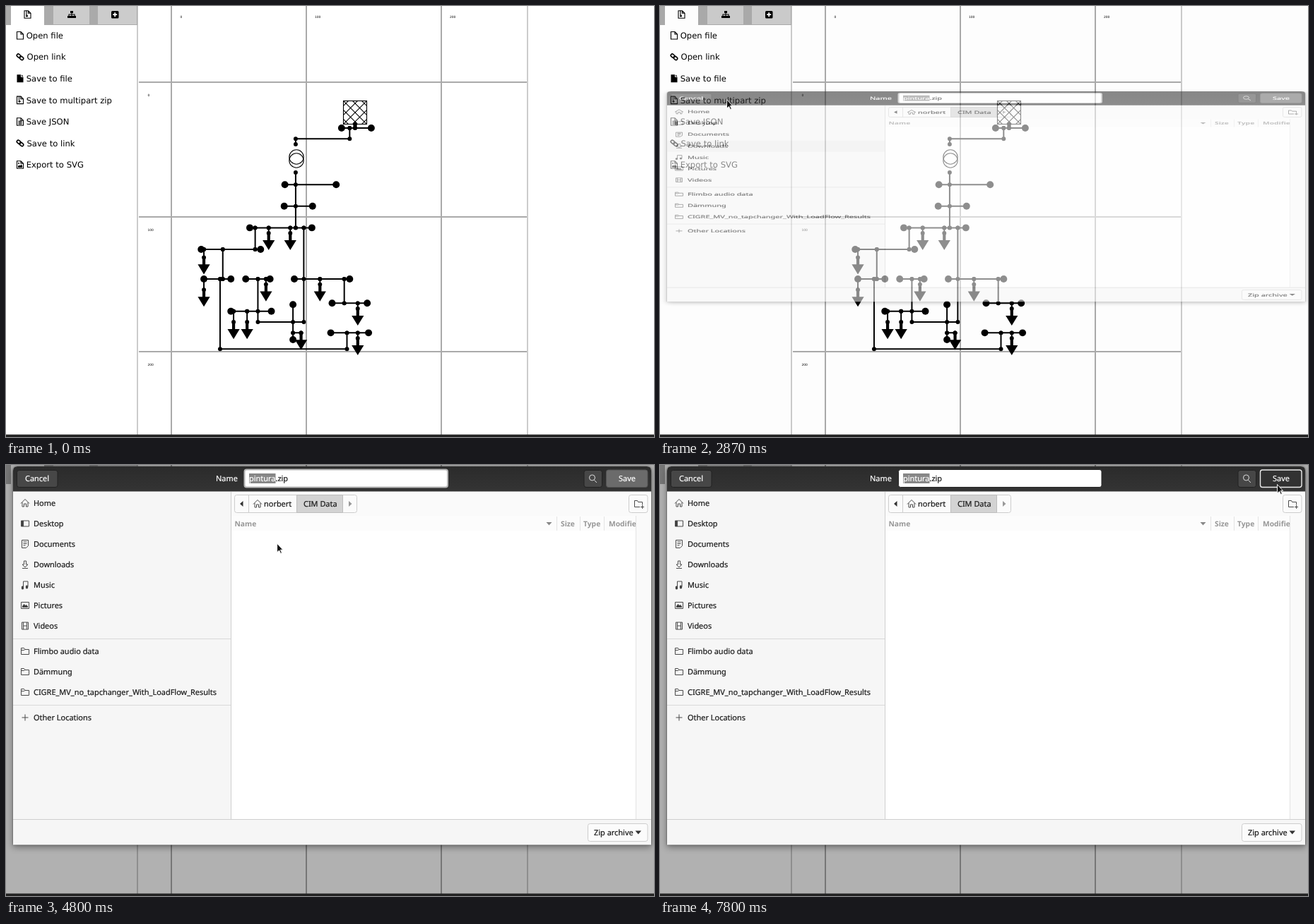
An HTML page that plays this animation: 917 by 611 pixels, repeating every 8 s.

```html
<!DOCTYPE html>
<html lang="en">
<head>
<meta charset="utf-8">
<title>Save to multipart zip</title>
<style>
  html, body { margin: 0; width: 100%; height: 100%; overflow: hidden; background: #fff; }
  svg { display: block; width: 100%; height: 100%; }
  text { text-rendering: geometricPrecision; white-space: pre; }
  marker { overflow: visible; }
  .page { font: 11.6px "DejaVu Sans", sans-serif; }
  .tick { font-size: 4.4px; }
  .url { font-size: 10.3px; fill: #444; }
  .ui { font: 10.95px "Noto Sans", sans-serif; }
  .ui text { color: #1c1c1c; fill: currentColor; stroke: currentColor; stroke-width: .22; }
  .ui .light { color: #fff; }
  .ui .col { color: #979797; font-weight: 700; font-size: 10.3px; stroke: none; }
  .line { fill: none; stroke: #4a4a4a; }
  .thin { fill: none; stroke: #000; stroke-width: 1.1; }
  .btn { fill: #fbfbfb; stroke: #cdcdcd; }
  .dark { fill: #474747; stroke: #222; }
  .wires path { fill: none; stroke: #000; stroke-width: 1.05; }
  .wire { marker: url(#dot); }
  .bus { marker: url(#end); marker-mid: url(#dot); }
  .load { marker-start: url(#dot); marker-end: url(#load); }
  #dialog { transform-origin: 461px 270px; }
  #frame { filter: drop-shadow(0 0 1px rgba(0, 0, 0, .5)) drop-shadow(0 3px 5px rgba(0, 0, 0, .4)); }
</style>
</head>
<body>
<svg viewBox="0 0 917 611" preserveAspectRatio="none">
  <defs>
    <linearGradient id="bar" x2="0" y2="1"><stop stop-color="#2b2b2b"/><stop offset="1" stop-color="#343434"/></linearGradient>
    <clipPath id="hatch"><path d="M477.5 134.5h33v33h-33z"/></clipPath>
    <clipPath id="list"><path d="M319 72h572.5v430H319z"/></clipPath>
    <marker id="dot" markerUnits="userSpaceOnUse"><circle r="1.55"/></marker>
    <marker id="end" markerUnits="userSpaceOnUse"><circle r="2.6"/></marker>
    <marker id="load" markerUnits="userSpaceOnUse"><circle r="1.55"/><path d="M-1.1 0h2.2v5.2h3.4l-4.5 7.4-4.5-7.4h3.4z" style="fill:#000;stroke:none"/></marker>
  </defs>

  <g class="page">
    <path fill="#fff" d="M0 0h917v611H0z"/>
    <path d="M186 0V608M738 0V608" stroke="#ccc" stroke-width="2"/>
    <g id="grid" stroke="#aaa" stroke-width="2"></g>
    <path fill="#aaa" d="M0 0h186v27H0z"/>
    <path fill="#fff" d="M7 0h47v28H7z"/>
    <path fill="#ccc" d="M67 0h51v26H67zM130 0h55v26h-55z"/>
    <path d="M91 7h4v3h-4zM87 14h4v3h-4zM91 14h4v3h-4zM95 14h4v3h-4z"/>
    <path class="thin" d="M93 10v4M89 14v-2h8v2"/>
    <rect x="149" y="7" width="10.5" height="10.5" rx="1.5"/>
    <path d="M154.2 9.2v6M151.2 12.2h6" stroke="#fff" stroke-width="1.8"/>
    <g id="menu"></g>
    <g id="wires" class="wires" transform="translate(234.2 108.1) scale(1.91)"></g>
    <path d="M491.5 167h5v5h-5z"/>
    <rect class="thin" x="477.5" y="134.5" width="33" height="33"/>
    <g id="mesh" class="thin" clip-path="url(#hatch)"></g>
    <circle class="thin" cx="411" cy="214" r="10.2"/>
    <circle class="thin" cx="411" cy="219" r="10.2"/>
    <g id="status">
      <path d="M-1 592.5H163q3.500 0 3.500 3.500V609H-1z" fill="#f4f4f4" stroke="#c4c4c4"/>
      <text class="url" x="3" y="604.5">https://sogno.energy/pintura/#</text>
    </g>
  </g>
  <path id="dim" d="M0 0h917v608H0z"/>
  <path fill="#222" d="M0 607.5h917v3.500H0z"/>

  <g id="dialog" class="ui">
    <path id="frame" fill="#f6f6f6" d="M10 538.500V8q0-6 6-6H907q6 0 6 6V538.500z"/>
    <path fill="url(#bar)" d="M10 37.500V8q0-6 6-6H907q6 0 6 6V37.500z"/>
    <rect class="dark" x="15.5" y="7.500" width="57.500" height="24" rx="3"/>
    <text class="light" x="27" y="23">Cancel</text>
    <text class="light" x="297" y="23">Name</text>
    <rect id="entry" x="337.5" y="6.500" width="287.500" height="25" rx="3" fill="#fff"/>
    <path fill="#878787" d="M344 12h37.500v14H344z"/>
    <text class="light" x="344" y="23">pintura<tspan color="#1c1c1c">.zip</tspan></text>
    <rect class="dark" x="818" y="7.500" width="25.500" height="24" rx="3"/>
    <path class="line" style="stroke:#ddd" d="M832.500 21.500l3.500 3.500M833.500 18a4 4 0 1 1-8 0a4 4 0 1 1 8 0"/>
    <rect id="save" x="849.5" y="7" width="58.500" height="24.500" rx="3"/>
    <text class="light" x="867" y="23">Save</text>

    <path id="hover" fill="#ededed" d="M10 127.500h308v28H10z"/>
    <path stroke="#d9d9d9" d="M10 246.500H318M10 340.500H318"/>
    <g id="places"></g>
    <path fill="#fff" d="M319 72h572v430H319z"/>
    <path fill="#fafafa" d="M319 38h594v34H319zM891 72h22v430h-22z"/>
    <path fill="#fcfcfc" d="M319 72h572v21H319z"/>
    <path fill="none" stroke="#cfcfcf" d="M318.500 38V502.500M10 502.500H913"/>
    <path stroke="#e4e4e4" d="M779.500 73v20M812.500 73v20M846.500 73v20M891.500 72V502"/>
    <rect class="btn" x="323.5" y="42.500" width="173" height="25" rx="3"/>
    <path fill="#d3d3d3" stroke="#bdbdbd" d="M411.500 42.500h65v25h-65z"/>
    <path stroke="#cdcdcd" d="M343.500 42.500v25"/>
    <path fill="#333" d="M335.500 51v8l-4.500-4z"/>
    <path fill="#999" d="M485 51v8l4.500-4z"/>
    <g id="crumb"></g>
    <text x="365" y="59">norbert</text>
    <text x="421" y="59">CIM Data</text>
    <rect class="btn" x="881.5" y="42.500" width="26.500" height="25" rx="3"/>
    <path class="line" d="M897 59.500h-7.500v-9h4l1 2h6v4M898 59.500h5M900.500 57v5"/>
    <g clip-path="url(#list)">
      <text id="sort" class="col" x="323.5" y="86.500">Name</text>
      <text class="col" x="785" y="86.500">Size</text>
      <text class="col" x="817" y="86.500">Type</text>
      <text class="col" x="853" y="86.500">Modified</text>
    </g>
    <path fill="#888" d="M764.500 81h8l-4 4.500z"/>
    <rect class="btn" x="823.5" y="508.500" width="84.500" height="25" rx="3"/>
    <text x="832" y="525">Zip archive</text>
    <path fill="#333" d="M890.500 518.500h8.500l-4.200 5z"/>
    <g id="tip">
      <rect x="37.5" y="155" width="163.500" height="40" rx="4" fill="#000"/>
      <text class="light" x="51" y="179">/home/norbert/Downloads</text>
    </g>
  </g>

  <g id="cursor">
    <path id="arrow" d="M-1-.5v12.500l3-2.600 2 4.300 1.800-.9-2-4.200h3.400z" fill="#111" stroke="#fff" stroke-width=".9"/>
    <path id="hand" d="M0 .3c0-1.700 2.500-1.700 2.500 0v4.400l4 1c1 .3 1.300 1 1.200 2l-.6 3c-.2 1-.8 1.800-1.800 1.800h-4c-1 0-1.600-.6-2-1.400l-2.600-4c-.6-1.200.6-2 1.600-1.200l1.700 1.400z" fill="#fff" stroke="#222"/>
  </g>
</svg>
<script>
const $ = id => document.getElementById(id);
const add = (id, html) => { $(id).innerHTML += html; };
const show = (id, on) => { $(id).style.display = on ? '' : 'none'; };
const at = (x, y, html) => `<g transform="translate(${x} ${y})">${html}</g>`;
const label = (x, y, s, cls = '') => `<text class="${cls}" x="${x}" y="${y}">${s}</text>`;
const path = (cls, d) => `<path class="${cls}" d="${d}"/>`;

// Grid and its scale, one cell is 191 px
for (let i = 0; i < 3; i++) {
  const step = i * 191;
  const s = i * 100;
  add('grid', path('', `M${234 + step} 0V608M188 ${108 + step}H737`));
  add('menu', label(i ? 246 + step : 246.5, 17, s, 'tick') + label(200.5, 128 + step, s, 'tick'));
}

// Page menu
const sheet = path('thin', 'M-4.5-5.2h5.5l3.5 3.500v7h-9zM1-5.2v3.500h3.500');
const pageIcon = {
  file: sheet,
  full: path('', 'M-4.5-5.5h5.5v3.500h3.500v7.500h-9zM2-5.5l2.500 2.500h-2.500z'),
  zip: sheet + '<path d="M-1.5-5v6" stroke="#000" stroke-width="1.8" stroke-dasharray="1.2 .8"/><circle cx="-1" cy="2" r="1.5"/>',
  text: sheet + path('thin', 'M-2.5-.5h5M-2.5 1.500h5M-2.5 3.500h5'),
  image: sheet + path('', 'M-3 4v-2l1.500-1.500 1.500 1 1.500-2 1.500 2v2.500z') + '<circle cx="-2" cy="-2" r="1"/>',
  link: '<g class="thin" transform="rotate(40)" style="stroke-width:1.6"><rect x="-5.5" y="-2" width="6" height="4" rx="2"/><rect x="-.5" y="-2" width="6" height="4" rx="2"/></g>'
};
[['file', 'Open file'], ['link', 'Open link'], ['full', 'Save to file'], ['zip', 'Save to multipart zip'],
 ['text', 'Save JSON'], ['link', 'Save to link'], ['image', 'Export to SVG']].forEach(([icon, name], i) => {
  const y = 41.7 + i * 30.55;
  add('menu', at(20, y, pageIcon[icon]) + label(icon === 'link' ? 29.5 : 28.7, y + 4.2, name));
});
add('menu', at(30.5, 12, pageIcon.zip));

// Network in grid units; every vertex carries a dot
const network = {
  bus: `M126 34H132 136 148,M84 76H92 122,M83.5 92H92 104.5,M58 108H62 72 88 92 98 104,
    M22 124H24 38 62 66,M24 146H36 38 44,M55 146H64 70 73,M91 146H98 110 128 132,
    M119 164H128 138 145,M44 170H46 56 64 74,M118 186H130 138 146,M90 165V178 186 191`,
  wire: 'M136 31v3M132 34V42H92V46M92 67V108M62 108V124M38 124V146M36 146V198H130V186M64 146V178H98V108M128 146V164M90 186H96',
  load: 'M72 108v4,M88 108v4,M24 124v6,M24 146v8,M70 146v4,M110 146v4,M138 164v4,M138 186v4,M46 170v8,M56 170v8,M96 186v0'
};
for (const [cls, list] of Object.entries(network)) {
  add('wires', list.split(',').map(d => path(cls, d)).join(''));
}
for (let k = -2; k <= 2; k++) {
  const x = 494 + k * 13;
  add('mesh', path('', `M${x - 20} 131l40 40M${x + 20} 131l-40 40`));
}

// Dialog sidebar
const line = d => path('line', d);
const fill = d => `<path fill="#444" d="${d}"/>`;
const placeIcon = {
  home: line('M-6 .5L0-5.5L6 .5M-4-1v6h2.500V1h3v4H4v-6'),
  desk: line('M-5.5-4h11v8h-11z') + fill('M-5-4h3v8h-3z'),
  doc: line('M-4.5-5.5h9v8l-3 3h-6zM-2.5-3h5M-2.5-.5h5M-2.5 2h3'),
  down: line('M-1.5-5v5h-2.500l4 4 4-4h-2.500v-5zM-4 5.500h8'),
  note: line('M-2.5 4v-9h6.500v7.500') + fill('M-5 4a1.700 1.700 0 1 0 3 0a1.700 1.700 0 1 0-3 0M1 3a1.700 1.700 0 1 0 3 0a1.700 1.700 0 1 0-3 0'),
  photo: line('M-5.5-4.5h11v9h-11z') + fill('M-4 3v-2l2.500-3 2 2 1.500-1 2 2.500v1.500z'),
  film: line('M-4.5-5h9v10h-9zM-2.5-5v10M2.500-5v10M-2.5 0h5'),
  folder: line('M-5.5 4.500v-9h4l1.500 2h5.500v7zM-5.5-1.5h4l1.500-1'),
  plus: line('M-4.5 0h9M0-4.5v9')
};
const groups = [
  [['home', 'Home'], ['desk', 'Desktop'], ['doc', 'Documents'], ['down', 'Downloads'], ['note', 'Music'],
   ['photo', 'Pictures'], ['film', 'Videos']],
  [['folder', 'Flimbo audio data'], ['folder', 'Dämmung'], ['folder', 'CIGRE_MV_no_tapchanger_With_LoadFlow_Results']],
  [['plus', 'Other Locations']]
];
let rowY = 54;
for (const group of groups) {
  for (const [icon, name] of group) {
    add('places', at(27, rowY, placeIcon[icon]) + label(39, rowY + 4, name));
    rowY += 29;
  }
  rowY += 7;
}
add('crumb', at(356, 55, placeIcon.home));

// Time runs in ticks of 1/15 s. A move lasts from..to and may sag below the straight line.
const linear = k => k;
const smooth = k => (1 - Math.cos(Math.PI * k)) / 2;
const moves = [
  { from: 6, to: 18, x: 121, y: 154, ease: smooth },
  { from: 19, to: 28, x: 95.5, y: 133, ease: smooth },
  { from: 54, to: 59, x: 341.5, y: 151, ease: linear, sag: 23 },
  { from: 63, to: 66, x: 367.5, y: 110, ease: smooth },
  { from: 71, to: 77, x: 623, y: 105.5, ease: smooth, sag: 8 },
  { from: 83, to: 95, x: 874.5, y: 28, ease: smooth }
];

const clamp = v => Math.max(0, Math.min(1, v));
const mix = (a, b, k) => a + (b - a) * k;
const gray = v => `rgb(${v},${v},${v})`;

function position(tick) {
  let [x, y] = [207, 12];
  for (const m of moves) {
    const k = m.ease(clamp((tick - m.from) / (m.to - m.from)));
    x = mix(x, m.x, k);
    y = mix(y, m.y, k) + 4 * k * (1 - k) * (m.sag || 0);
  }
  return [x, y];
}

function draw() {
  const tick = Math.floor((performance.now() % 8000 + 4) * 15 / 1000) % 120;
  const [x, y] = position(tick);
  const onLink = tick >= 12 && tick < 43;

  show('cursor', tick > 6);
  $('cursor').setAttribute('transform', `translate(${x} ${y})`);
  show('hand', onLink);
  show('arrow', !onLink);
  $('status').style.opacity = clamp((tick - 11) / 3) * clamp((43 - tick) / 4);

  // The page darkens behind the dialog, pausing midway
  const shade = tick < 51 ? Math.min(tick, 46) : tick;
  $('dim').setAttribute('opacity', 0.306 * clamp((shade - 42.8) / 7.3));

  const rest = 1 - clamp((tick - 42.5) / 1.5);
  const open = 1 - rest * rest;
  show('dialog', open > 0);
  $('dialog').style.transform = `scaleY(${open})`;
  $('dialog').style.opacity = open;
  show('hover', tick < 57);
  show('tip', tick === 55 || tick === 56);
  $('sort').style.color = tick > 83 && y > 72 && y < 93 && x < 780 ? '#444' : '';

  const press = clamp((tick - 114) / 3);
  $('save').setAttribute('fill', gray(mix(107, 50, press)));
  $('save').setAttribute('stroke', gray(mix(85, 235, press)));
  $('save').setAttribute('stroke-width', mix(1, 1.4, press));
  $('entry').setAttribute('stroke', gray(mix(184, 40, press)));
  $('entry').setAttribute('stroke-width', mix(2, 1, press));
  requestAnimationFrame(draw);
}
draw();
</script>
</body>
</html>
```
